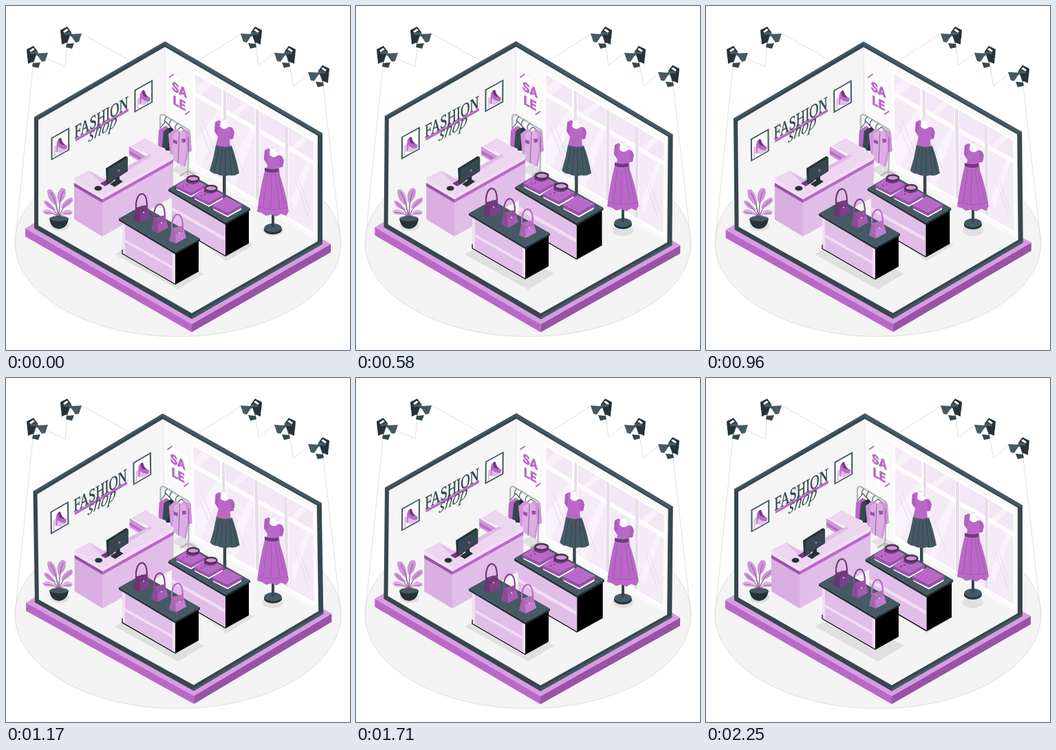
Recreate the animation shown at these times as an HTML page. Size 500x500 px, loop 2.29 s.

```html
<!DOCTYPE html>
<html lang="en">
<head>
<meta charset="utf-8">
<title>Fashion shop</title>
<style>
  html, body { margin: 0; width: 100%; height: 100%; overflow: hidden; background: #fff; }
  svg { display: block; width: 100vw; height: 100vh; }
  .ink { fill: #37474f; }
  .slate { fill: #455a64; }
  .night { fill: #263238; }
  .black { fill: #000; }
  .white { fill: #fff; }
  .main { fill: #ba68c8; }
  .deep { fill: #9a52a8; }
  .plum { fill: #70397b; }
  .lilac { fill: #e1bee7; }
  .pale { fill: #f1def4; }
  .mid { fill: #cf95d9; }
  .shade { fill: #e0e0e0; }
  .line { fill: none; stroke: #e0e0e0; stroke-width: 1; }
  .thin { fill: none; stroke: #70397b; stroke-width: .7; }
  .pipe { fill: none; stroke: #b5b8ba; stroke-width: 2.4; stroke-linejoin: round; }
</style>
</head>
<body>
<svg viewBox="0 0 500 500">
  <defs>
    <g id="lamp">
      <path class="night" d="M30 63L40 58 43 62 46 66 46 73 38 79 31 75z"/>
      <path class="white" d="M34 65l5-4 3 2-6 4z"/>
      <path class="slate" d="M35 67l9-2 4 5-8 13-4-4z"/>
      <path class="white" d="M44 71L52 78 50 83 40 83z"/>
      <path class="slate" d="M44 69L61 68 57 80 52 81z"/>
      <path class="ink" d="M39 83L50 82 47 90 38 88z"/>
      <path class="night" d="M31 70L44 70 39 81 32 84z"/>
    </g>
    <g id="pic">
      <path fill="#fafafa" stroke="#455a64" stroke-width="2" d="M0 0H24V31H0z"/>
      <path class="lilac" d="M3 15Q6 12 8 16L13 22 21 27V29H13L5 23V29H3z"/>
      <path class="main" d="M7 11Q9 4 13 8Q15 17 22 24L21 28Q14 25 9 17L8 25H7z"/>
      <path class="plum" d="M10 8Q12 4 14 10Q15 16 19 21Q13 18 11 13z"/>
    </g>
    <g id="bag">
      <path d="M4 22V14Q6 0 13 0Q20 1 20 19" fill="none" stroke-width="2.2"/>
      <g stroke="none">
        <path d="M4 20L20 16 25 34 10 42 0 38z"/>
        <path d="M4 20L9 26 10 42 0 38z" fill="#000" opacity=".16"/>
        <path d="M4 20L20 16 22 24 10 29z" fill="#000" opacity=".1"/>
        <circle cx="15" cy="27" r="1" class="pale"/>
      </g>
    </g>
    <g id="shirt">
      <path class="white" d="M-20 4L1 15 21 4V7L1 18-20 7z"/>
      <path class="deep" d="M-21 1L1 12 22 0V4L1 16-21 5z"/>
      <path class="main" d="M-21 1L-1-12 22 0 1 12z"/>
    </g>
    <g id="collar">
      <path class="plum" d="M-6-7L-6-2Q4 4 13-3L13-7z"/>
      <ellipse class="mid" cx="4" cy="-7" rx="8.500" ry="4" stroke="#4b3453" stroke-width="2.400"/>
      <circle class="plum" cx="-5" cy="2" r="1"/><circle class="plum" cx="-10" cy="4" r="1"/>
    </g>
    <g id="bust">
      <path class="white" d="M8 0Q12-2 16 0L17 6 22 11 18 17 8 11z"/>
      <ellipse fill="#e8e8e8" cx="12.500" cy="0" rx="4" ry="1.500"/>
      <path class="main" d="M1 4L6 1 9 2 8 10Q14 17 20 11Q27 9 29 19L27 28 22 29 23 39Q13 43 2 38L5 25 0 17z"/>
      <path class="deep" d="M1 4L5 2Q6 12 4 23L0 17zM23 12Q30 13 27 28L23 28z" opacity=".4"/>
    </g>
  </defs>

  <ellipse cx="250" cy="344" rx="237" ry="136.5" fill="#f4f4f4" stroke="#dedede"/>
  <path class="line" d="M39 88L13 345M60 77L86 88 89 58M110 40L182 80M341 41L278 81M363 58L367 86 392 67M413 89L418 117 441 97M461 116L487 345"/>
  <use href="#lamp"/>
  <use href="#lamp" x="49" y="-28"/>
  <use href="#lamp" transform="translate(402 -28) scale(-1 1)"/>
  <use href="#lamp" transform="translate(451 0) scale(-1 1)"/>
  <use href="#lamp" transform="translate(500 28) scale(-1 1)"/>

  <g id="room">
    <path class="main" d="M28 323L270 462V474L28 335z"/>
    <path class="deep" d="M472 346L270 462V474L472 358z"/>
    <path fill="#d79ce0" d="M28 323L45 313 270 440 455 336 472 346 270 462.500z"/>
    <path fill="#f4f4f4" d="M44 163L231 56 457 187V344L270 452 44 321z"/>
    <path fill="#f5f5f5" d="M44 163L231 56V214L44 321z"/>
    <path fill="#fafafa" d="M231 56L457 187V344L231 214z"/>
    <path d="M231 58V214" stroke="#e9e1ec"/>

    <g transform="matrix(1 .577 0 1 231 52)">
      <path class="white" d="M41 18H219V155H41z"/>
      <path fill="#f3e6f6" d="M44 22h38v25h-38zM90 21h41v26h-41zM138 21h37v26h-37zM180 21h36v26h-36z"/>
      <path fill="#f5ebf7" d="M44 54h38v98h-38zM90 54h41v98h-41zM138 54h37v98h-37zM180 54h36v98h-36z"/>
      <path fill="#ddd3e0" d="M132 21h5v131h-5zM175 21h4v131h-4zM85 21h4v131h-4z" opacity=".75"/>
      <path class="white" opacity=".4" d="M44 40L58 22H70L44 58zM97 47L116 21H124L104 47zM44 120L78 54H82V72L52 152H44zM94 128L124 54H131L102 152H96zM142 120L170 54H175V66L146 135zM184 122L206 54H212L187 140zM183 47L201 21H209L191 47z"/>
      <path stroke="#e9d3ee" fill="none" d="M50 92L68 126M54 82L75 122M99 92L118 132M148 88L166 126M190 92L208 134M195 90L211 124"/>
    </g>

    <path class="white" stroke="#efefef" stroke-width=".6" d="M238 96L267 113V164L238 147z"/>
    <g transform="matrix(.9 .5 0 1 241 122)" class="main" stroke="#ba68c8" stroke-width=".6" font-family="Roboto, 'Liberation Sans', sans-serif" font-weight="900" font-size="18.500">
      <text x="0" y="0">SA</text>
      <text x="2" y="19.5">LE</text>
    </g>
    <path d="M237 104L244 99M260 158L267 153" stroke="#ba68c8" stroke-width="2"/>

    <use href="#pic" transform="matrix(1.03 -.58 0 1 66.5 192)"/>
    <use href="#pic" transform="matrix(1.03 -.58 0 1 187.5 122.5)"/>
    <path class="main" d="M101 193L178 149V153L101 197z"/>
    <g class="ink" font-family="'Liberation Serif', serif">
      <text transform="matrix(.68 -.385 0 1 99.5 193)" font-size="27" stroke="#37474f" stroke-width=".5">FASHION</text>
      <text transform="matrix(.75 -.43 -.15 1 119 198)" font-style="italic" font-size="29">shop</text>
    </g>

    <path class="ink" fill-rule="evenodd" d="M231 51.500L460 185V346L270 455 41 323V161.500zM231 59.500L47 165.500V319L270 446.500 453 342V188.500z"/>
    <path class="slate" d="M231 51.500L460 185 456 188 231 57zM270 451L460 342V346L270 455z"/>
    <path class="slate" d="M41 161.500L231 51.500V55L44 164z" opacity=".8"/>
  </g>

  <g class="shade">
    <path d="M240 238L254 230 278 243 264 251zM158 361L250 412 288 389 196 340z"/>
    <path d="M252 319L320 371 360 347 290 310z"/>
    <ellipse cx="388" cy="326" rx="15" ry="8.500"/>
    <ellipse cx="78" cy="319" rx="14" ry="8"/>
  </g>

  <g id="plant">
    <path class="thin" d="M77 309L72 288M77 309Q77 292 79 283M77 309Q80 297 86 290M77 309Q74 300 68 295M77 309Q73 302 68 300M77 309Q80 302 85 299"/>
    <path class="night" d="M63 309Q77 302 91 309Q89 323 77 324Q65 323 63 309z"/>
    <ellipse class="slate" cx="77" cy="309" rx="13.500" ry="4"/>
    <path class="mid" d="M74 291Q61 284 60 270Q60 265 66 267Q75 275 74 291zM77 287Q71 274 80 265Q87 263 87 271Q86 281 77 287zM80 294Q82 283 95 278Q100 282 93 288Q88 293 80 294zM73 297Q58 295 55 284Q60 279 73 297z"/>
    <path fill="#dcaee4" d="M72 301Q58 307 53 299Q58 291 72 301zM81 301Q88 292 97 299Q95 308 81 301z"/>
    <path class="thin" d="M77 309Q75 288 65 271M77 309Q77 282 83 269M77 309Q80 293 94 282M77 309Q73 298 59 286M77 309Q71 300 56 300M77 309Q83 300 95 301"/>
  </g>

  <g id="shop">
    <path class="pipe" d="M224 205V162Q224 157 229 158L264 179Q268 182 266 188L264 246M253 247L264 240 275 246"/>
    <path d="M231 169Q229 164 234 161M238 174Q236 169 241 165M246 179Q245 173 250 171M224 178L232 168 246 183 254 176 266 184" fill="none" stroke="#455a64" stroke-width="1.200"/>
    <path class="main" d="M222 181L232 174 239 179 232 208 221 203z"/>
    <path class="night" d="M229 183L239 176 248 184 244 211 232 210z"/>
    <path class="ink" d="M229 182L235 177 240 185 234 208 227 205z"/>
    <path class="mid" d="M236 186L246 178 254 183 258 178 268 184 270 211 265 213 261 234 239 222z"/>
    <path fill="#dcaee4" d="M243 186L251 181 260 184 263 208 258 233 241 223z"/>
    <path class="deep" d="M243 194l6 2v5l-6-2zM255 193l6 0v5l-5 1z"/>
    <path class="thin" d="M252 183L250 229M265 190V212"/>

    <path class="ink" d="M315 242h4.500v42h-4.500z"/>
    <use href="#bust" x="303" y="165"/>
    <path class="slate" d="M305 202Q317 207 328 203Q335 222 339 243Q332 248 325 246Q314 249 306 244Q300 244 296 239Q302 221 305 202z"/>
    <path d="M309 206L303 242M314 207L311 245M319 207V246M324 206L328 245M327 206L335 243" stroke="#37474f" stroke-width="1.200"/>

    <path fill="#d8afe0" d="M99 259L140 284V335L99 310z"/>
    <path class="lilac" d="M140 284L243 225V277L140 335z"/>
    <path class="pale" d="M99 250L141 274 243 216V222L141 280 99 256z"/>
    <path class="deep" d="M99 257L140 281V286L99 262z"/>
    <path class="main" d="M140 281L243 223V228L140 286z"/>
    <path class="mid" d="M179 204L206 220V233L179 217z"/>
    <path class="main" d="M179 210L206 226V230L179 214z"/>
    <path fill="#edd6f0" d="M99 250L121 239 142 251 208 216 181 204 202 192 243 217 141 276z"/>
    <path class="mid" d="M121 240L142 252 208 215 212 218 150 255 140 259z" opacity=".4"/>
    <path class="plum" d="M137 258L149 251 156 255 144 262z"/>
    <ellipse class="night" cx="134" cy="265" rx="5.500" ry="3.500"/>
    <path class="night" d="M151 259L163 251 170 255 158 263zM159 246h6v10h-6z"/>
    <path class="night" d="M145 236L174 218 177 220V240L148 259 146 256z"/>
    <path class="ink" d="M149 237L177 220V240L148 258z"/>
    <circle class="main" cx="164" cy="239" r="1.500"/>
  </g>

  <g id="stand">
    <path class="lilac" d="M241 272L319 317V363L241 318z"/>
    <path class="pale" d="M241 292L318 336V341L241 297z"/>
    <path d="M241 318L319 363.500" fill="none" stroke="#000" stroke-width="1.200"/>
    <path class="black" d="M319 317L353 298V345L319 364z"/>
    <path class="slate" d="M236 266L270 246 355 294 319 314.500z"/>
    <path class="night" d="M236 266L319 314.500 355 294V297L319 318 236 269z"/>
    <use href="#shirt" x="268" y="260"/><use href="#collar" x="268" y="258"/>
    <use href="#shirt" x="294" y="274"/><use href="#collar" x="294" y="272"/>
    <use href="#shirt" x="321" y="289"/>
    <path class="thin" d="M301 291L322 302 342 290" opacity=".6"/>
  </g>

  <g id="dress">
    <ellipse class="night" cx="388" cy="325" rx="13" ry="7"/>
    <ellipse class="slate" cx="388" cy="322.500" rx="12.500" ry="6.500"/>
    <path class="ink" d="M386 300h4v22h-4z"/>
    <use href="#bust" x="375" y="206"/>
    <path class="main" d="M376 240Q386 244 396 240Q406 267 411 298L407 305 400 302 393 306 386 303 378 305 372 301 365 299Q369 267 376 240z"/>
    <path class="plum" d="M376 235Q386 239 396 236V241Q386 244 376 240z"/>
    <path d="M380 244L374 292M386 245L385 294M391 244L398 292M395 244L405 290M366 292Q388 299 410 293" fill="none" stroke="#9a52a8" stroke-width=".8"/>
  </g>

  <g id="table">
    <path class="lilac" d="M169 314L246 359V404L169 359z"/>
    <path class="pale" d="M169 337L245 380V384L169 341zM169 314h4v47l-4-2zM242 357h4v47l-4-2z"/>
    <path d="M169 354V360L246 404.500" fill="none" stroke="#000" stroke-width="1.200"/>
    <path class="black" d="M246 359L280 340V386L246 405z"/>
    <path class="slate" d="M164 309L198 290 282 338 246 357.500z"/>
    <path class="night" d="M164 309L246 357.500 282 338V341L246 361 164 312z"/>
    <use href="#bag" x="185" y="273" fill="#7e4189" stroke="#70397b"/>
    <use href="#bag" x="211" y="288" fill="#a75bb4" stroke="#8a4896"/>
    <use href="#bag" x="237" y="303" fill="#c47dd0" stroke="#ba68c8"/>
  </g>
</svg>
<script>
  const LOOP = 2290, CYCLE = 1500, FPS = 24;

  // Each track is a list of [share of the cycle, value], joined linearly.
  const sway = [[0, 0], [.25, 1], [.75, -1], [1, 0]];
  const shake = [[0, 0], [.1, -1], [.2, 2], [.3, -4], [.4, 4], [.5, -4], [.6, 4], [.7, -4], [.8, 2], [.9, -1], [1, 0]];
  const beat = [[0, 1], [.14, 1.1], [.28, 1], [.42, 1.1], [.7, 1], [1, 1]];
  const hover = [[0, 0], [.5, -10], [1, 0]];

  const at = (track, p) => {
    const i = track.findIndex(([end]) => end > p);
    const [[a, from], [b, to]] = [track[i - 1], track[i]];
    return from + (to - from) * (p - a) / (b - a);
  };

  const parts = [
    ['room', sway, v => `rotate(${v} 250 262.5)`],
    ['shop', shake, v => `translate(${v} 0)`],
    ['stand', beat, v => `translate(295.5 305) scale(${v}) translate(-295.5 -305)`],
    ['dress', hover, v => `translate(0 ${v})`],
    ['table', hover, v => `translate(0 ${v})`]
  ].map(([id, track, move]) => ({ el: document.getElementById(id), track, move }));

  const start = performance.now();
  function draw() {
    const t = (performance.now() - start) % LOOP;
    const step = Math.floor((t + 4) * FPS / 1000);
    const p = step * 1000 / FPS % CYCLE / CYCLE;
    for (const { el, track, move } of parts) el.setAttribute('transform', move(at(track, p)));
    requestAnimationFrame(draw);
  }
  draw();
</script>
</body>
</html>
```
